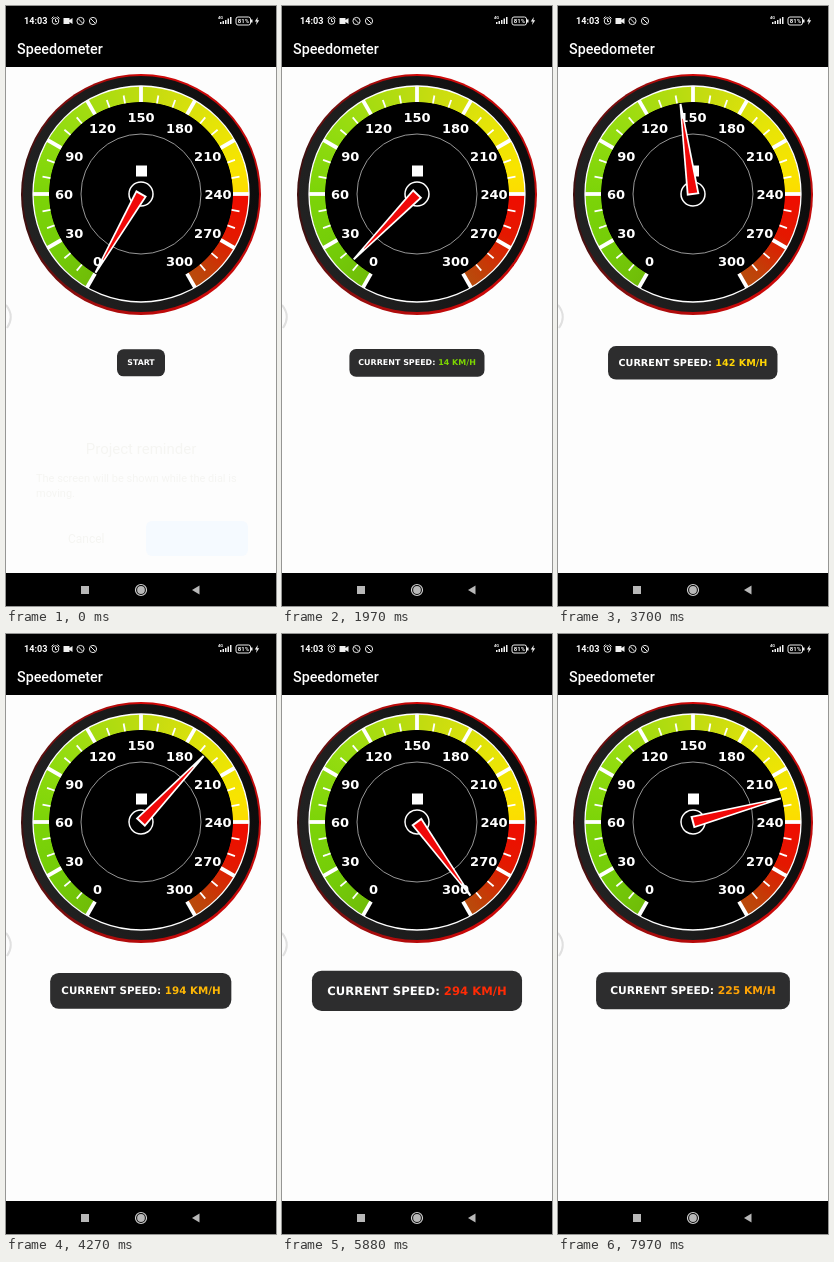
An HTML page for the animation above (8000 ms loop, 270 px wide and 600 px high).

```html
<!DOCTYPE html>
<html lang="en">
<head>
<meta charset="utf-8">
<title>Speedometer</title>
<style>
  html, body { margin: 0; width: 100%; height: 100%; overflow: hidden; background: #fdfdfd; }
  #stage { position: relative; width: 270px; height: 600px; overflow: hidden; background: #fdfdfd; }
  #stage > * { position: absolute; }
  svg { left: 0; top: 0; }
  .wide { font-family: "DejaVu Sans", Verdana, sans-serif; font-weight: 700; }
  .ui { font-family: Roboto, sans-serif; }
  .rim, .face, .band { border-radius: 50%; }
  .rim {
    left: 15px; top: 68px; width: 240px; height: 241px;
    background: conic-gradient(#d00808, #c00c0c 90deg, #cc0808 150deg, #a80c0c 200deg, #401010 250deg, #401010 290deg, #d00808);
  }
  .face {
    left: 17px; top: 70px; width: 236px; height: 236px;
    background: linear-gradient(75deg, #242424, #1c1c1c 40%, #121212 70%, #0a0a0a);
  }
  .band {
    left: 27px; top: 80px; width: 216px; height: 216px;
    background: conic-gradient(from 210deg, #70bc08, #74cc08 25deg, #7cd408 60deg, #94dc10 100deg,
      #b0dc10 135deg, #c8dc10 160deg, #e4e408 195deg, #f8e400 225deg, #fcdc00 240deg,
      #f00c00 240deg, #e41800 265deg, #c04008 290deg, #b84c0c 300deg, #000 300deg);
    -webkit-mask: radial-gradient(circle, transparent 91.5px, #000 92.3px);
    mask: radial-gradient(circle, transparent 91.5px, #000 92.3px);
  }
  #tag {
    left: 135px; top: 357px; height: 27.3px; border-radius: 6.5px; background: #2d2d2e; color: #fff;
    display: flex; align-items: center; justify-content: center;
    font-size: 7.8px; white-space: pre;
  }
</style>
</head>
<body>
<div id="stage">
  <div class="rim"></div>
  <div class="face"></div>
  <svg width="270" height="600"><circle cx="135" cy="188" r="108" fill="#000"/></svg>
  <div class="band"></div>
  <svg width="270" height="600" viewBox="0 0 270 600">
    <g fill="none">
      <circle cx="135" cy="188" r="108" stroke="#fff" stroke-width="1.3"/>
      <circle cx="135" cy="188" r="60" stroke="#a8a8a8" stroke-width=".9"/>
    </g>
    <g id="ticks" stroke="#fff"></g>
    <g id="labels" class="wide" font-size="13" fill="#fff" text-anchor="middle"></g>
    <rect x="130" y="159.500" width="11" height="11" fill="#fff"/>
    <circle cx="135" cy="188" r="12" fill="#000" stroke="#fff" stroke-width="1.5"/>
    <g id="needle">
      <path d="M-6.300 -1H6.300L1 91H-1Z" fill="#fff"/>
      <path d="M-4.400 1H4.400L.3 76H-.3Z" fill="#f00808"/>
    </g>

    <path d="M0 299Q9 310 1 322" fill="none" stroke="#e0e0e0" stroke-width="2"/>

    <g id="ghost" class="ui" fill="#f5f5f2">
      <rect x="140" y="515" width="102" height="35" rx="6" fill="#f5faff"/>
      <text x="135" y="448" font-size="15" text-anchor="middle">Project reminder</text>
      <text x="30" y="476" font-size="11">The screen will be shown while the dial is</text>
      <text x="30" y="491" font-size="11">moving.</text>
      <text x="62" y="537" font-size="12">Cancel</text>
    </g>

    <path d="M0 0H270V61H0ZM0 567H270V600H0Z" fill="#000"/>
    <g class="ui" fill="#fff">
      <text x="11" y="48" font-size="14.300" font-weight="500">Speedometer</text>
      <text x="18" y="18" font-size="9.100" font-weight="600">14:03</text>
      <text x="212" y="13" font-size="4" font-weight="700">4G</text>
      <text x="237.500" y="17.200" font-size="6" font-weight="700" text-anchor="middle">81%</text>
    </g>
    <g fill="none" stroke="#e8e8e8" stroke-width="1">
      <circle cx="49.500" cy="15" r="3.300"/>
      <path d="M49.500 13V15.500H51M45.500 12.500L47.500 10.500M53.500 12.500L51.500 10.500"/>
      <circle cx="74.500" cy="15" r="3.600"/>
      <circle cx="87" cy="15" r="3.600"/>
      <path d="M72.500 13L76.500 17M85 13L89 17"/>
      <rect x="230" y="11" width="14.500" height="8" rx="2"/>
    </g>
    <g fill="#f0f0f0">
      <path d="M57.500 12H63.500V14L66.500 12V18L63.500 16V18H57.500Z"/>
      <path d="M214 18V16H215.500V18ZM216.500 18V15H218V18ZM219 18V14H220.500V18ZM221.500 18V12.500H223V18ZM224 18V11H225.500V18Z"/>
      <path d="M245 13.500H246.500V16.500H245ZM251.800 11L248.800 15.500H250.700L250 19L253.200 14.300H251.300Z"/>
    </g>
    <g fill="#b8b8b8">
      <rect x="75" y="580" width="8" height="8"/>
      <path d="M186 584L193.500 579.500V588.500Z"/>
      <circle cx="135" cy="584" r="3.900"/>
      <circle cx="135" cy="584" r="5.500" fill="none" stroke="#d0d0d0" stroke-width="1.200"/>
    </g>
  </svg>
  <div id="tag" class="wide"><span id="word"></span><span id="num"></span></div>
</div>
<script>
const $ = id => document.getElementById(id);
const LOOP = 8000, START = 1450, CX = 135, CY = 188;

// [ms, km/h]
const speeds = [[0, 0], [START, 0], [1970, 14], [3700, 142], [4810, 238],
  [5880, 294], [6350, 300], [6860, 291], [7970, 225], [8000, 223]];
// [km/h, hue]
const hues = [[0, 92], [14, 85], [142, 50], [225, 38], [238, 34], [294, 9], [300, 6]];

const chord = (k, i) => (k[i + 1][1] - k[i][1]) / (k[i + 1][0] - k[i][0]);

// Monotone cubic: flat at extremes, harmonic mean of the chords elsewhere.
function slope(k, i) {
  if (i === 0) return chord(k, 0);
  if (i === k.length - 1) return chord(k, i - 1);
  const a = chord(k, i - 1), b = chord(k, i);
  return a * b > 0 ? 2 * a * b / (a + b) : 0;
}

function curve(k, x) {
  let i = 0;
  while (i < k.length - 2 && x >= k[i + 1][0]) i++;
  const [x0, y0] = k[i], [x1, y1] = k[i + 1];
  const h = x1 - x0, u = (x - x0) / h, w = 1 - u;
  return w * w * (1 + 2 * u) * y0 + u * u * (3 - 2 * u) * y1
    + h * u * w * (w * slope(k, i) - u * slope(k, i + 1));
}

function polar(v, r) {
  const a = (30 + v) * Math.PI / 180;
  return [CX - r * Math.sin(a), CY + r * Math.cos(a)];
}

function add(parent, name, attrs, text = "") {
  const el = document.createElementNS("http://www.w3.org/2000/svg", name);
  for (const key in attrs) el.setAttribute(key, attrs[key]);
  el.textContent = text;
  parent.append(el);
}

for (let v = 0; v <= 300; v += 10) {
  const major = v % 30 === 0;
  const [x1, y1] = polar(v, 92), [x2, y2] = polar(v, major ? 108 : 100);
  add($("ticks"), "line", { x1, y1, x2, y2, "stroke-width": major ? 3.8 : 1.8 });
  if (major) {
    const [x, y] = polar(v, 77);
    add($("labels"), "text", { x: x - (v ? 0 : 5), y: y + 5.3 }, v);
  }
}

function tagWidth(n) {
  const ones = n.split("1").length - 1;
  return 141 - (3 - n.length) * 5.3 - ones * 3.6;
}

function draw(t) {
  const v = curve(speeds, t), n = String(Math.round(v)), on = t >= START;
  $("needle").setAttribute("transform", `translate(${CX} ${CY}) rotate(${30 + v})`);
  $("ghost").style.display = t < 430 ? "" : "none";
  $("word").textContent = on ? "CURRENT SPEED: " : "START";
  $("num").textContent = on ? n + " KM/H" : "";
  $("num").style.color = `hsl(${curve(hues, v)} 100% ${v < 60 ? 42 : 51}%)`;
  $("tag").style.width = (on ? tagWidth(n) : 48) + "px";
  $("tag").style.transform = `translate(-50%, -50%) scale(${1 + v / 600})`;
}

function tick() {
  draw(performance.now() % LOOP);
  requestAnimationFrame(tick);
}
tick();
</script>
</body>
</html>
```
